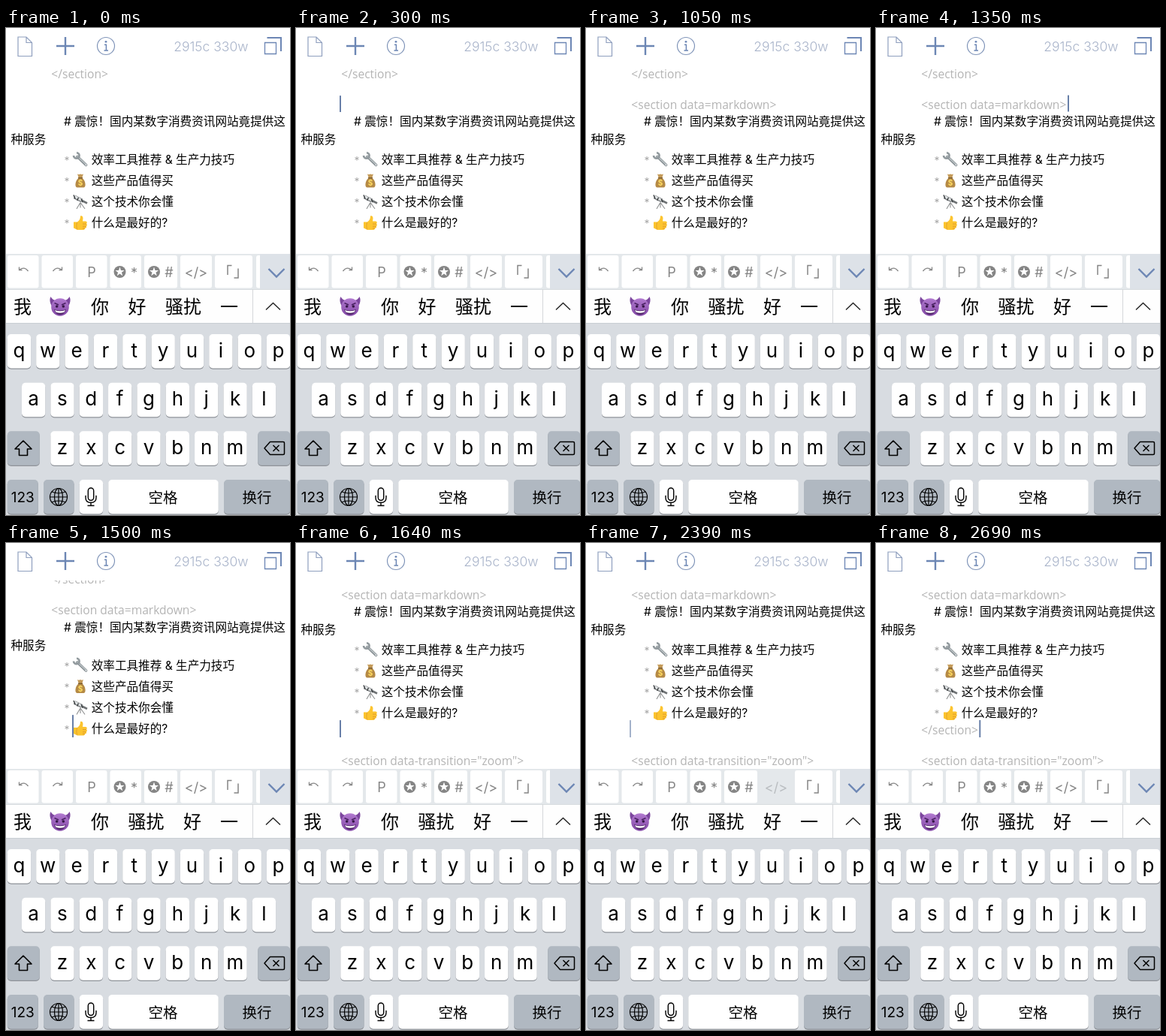
These frames come from a looping animation (378x649 px, 3.74 s). An HTML page with a canvas:

```html
<!DOCTYPE html>
<html lang="zh-CN">
<head>
<meta charset="utf-8">
<title>Markdown editor</title>
<style>
html, body { margin: 0; width: 100%; height: 100%; overflow: hidden; background: #fff; }
canvas { display: block; width: 378px; height: 649px; }
</style>
</head>
<body>
<canvas id="stage"></canvas>
<script>
const W = 378, H = 649, LOOP = 3740;
const canvas = document.getElementById('stage');
const dpr = window.devicePixelRatio || 1;
canvas.width = Math.round(W * dpr);
canvas.height = Math.round(H * dpr);
const c = canvas.getContext('2d');

const CJK = '"Noto Sans CJK SC", "Noto Sans CJK", sans-serif';
const CODE = '"Open Sans", "Noto Sans", sans-serif';
const KEYS = 'Inter, Roboto, sans-serif';
const BODY = '15.6px Inter, ' + CJK;
const BLUE = '#6c86b4', BED = '#d8dce1', BAR = '#e4e8eb', DARK = '#b0b8c1', GREY = '#858585';

// Caret: start time, x, top, height, opacity
const carets = [
  [0, 58, 90, 22, 0], [150, 58, 90, 22, .4], [300, 58, 90, 22, 1],
  [450, 255, 89.5, 22, 1], [750, 255, 89.5, 22, .4], [900, 255, 89.5, 22, 0],
  [1200, 255, 89.5, 22, .4], [1350, 255, 89.5, 22, 1],
  [1500, 88, 229, 30, 1],
  [1640, 58, 236, 23, 1], [1940, 58, 236, 23, .6], [2090, 58, 236, 23, 0],
  [2390, 58, 236, 23, .6], [2540, 137.3, 236, 23, 1]
];

function text(s, x, y, font, color, align = 'left') {
  c.font = font;
  c.fillStyle = color;
  c.textAlign = align;
  c.fillText(s, x, y);
}

function box(x, y, w, h, r, color) {
  c.fillStyle = color;
  c.beginPath();
  c.roundRect(x, y, w, h, r);
  c.fill();
}

function stroke(d, color, width) {
  c.strokeStyle = color;
  c.lineWidth = width;
  c.stroke(new Path2D(d));
}

function fill(d, color) {
  c.fillStyle = color;
  c.fill(new Path2D(d));
}

function disc(x, y, r, color) {
  c.fillStyle = color;
  c.beginPath();
  c.arc(x, y, r, 0, 7);
  c.fill();
}

function at(x, y, draw) {
  c.save();
  c.translate(x, y);
  draw();
  c.restore();
}

function wrench() {
  c.lineCap = 'round';
  stroke('M-4-4L7.5 7', '#858d91', 3.8);
  stroke('M-4-4.4L7.5 6.4', '#b9c0c3', 1.6);
  c.lineCap = 'butt';
  stroke('M-9-5.5A3.8 3.8 0 1 0-5-9.3', '#929a9e', 2.6);
  disc(7.5, 7, .9, '#eef1f2');
}

function moneyBag() {
  fill('M-2.5-3.5C-7 0-8 8.5-4.5 9H4.5C8 8.5 7 0 2.5-3.5Z', '#b58a45');
  fill('M-4-9Q-2-7.5 0-9Q2-7.5 4-9L2.3-4H-2.3Z', '#c49a58');
  stroke('M-3-3.7H3', '#7b5a2a', 1.4);
  text('$', 0, 6.8, 'bold 10px Inter, sans-serif', '#ffdc62', 'center');
}

function telescope() {
  stroke('M0 1L-5 9.5M0 1L6 9.5M0 1V8', '#8d8f90', 1.1);
  stroke('M-8-6.5L2-1.5', '#7a7e80', 5);
  stroke('M-7.5-6.8L1.5-2.2', '#dfe2e3', 3);
  stroke('M2-1.5L9 2', '#6f7375', 2.6);
  stroke('M-9-9L-7-4M1.2-3.8L3 .8M-2.6-5.5L-4.3-1.5', '#3c4042', 1.4);
}

function thumb() {
  fill('M-9-1H-4C-1-3 0-6 0-9Q3-10 3.5-6L3-2H7Q10-1 8 1.5Q10 3 7.7 4.8Q9 7 6 7.5Q6 10 2 9.5H-4L-9 7Z', '#fcc42f');
  stroke('M3 1.6H8M3 4.8H7.5M3 7.4H6', '#dd982c', .9);
  stroke('M-4.5-.5Q-6 4-4.5 8.8', '#e4a32c', 1);
}

function devil() {
  fill('M-11.5-1Q-15-8-12.5-13Q-10-8-5-8ZM11.5-1Q15-8 12.5-13Q10-8 5-8Z', '#7c469e');
  const g = c.createLinearGradient(0, -11, 0, 13);
  g.addColorStop(0, '#b27ad0');
  g.addColorStop(1, '#8349a6');
  disc(0, 1, 11.8, g);
  disc(-4.3, 0, 1.8, '#351746');
  disc(4.3, 0, 1.8, '#351746');
  stroke('M-7.5-4.5L-2-2M7.5-4.5L2-2', '#4b2263', 1.4);
  fill('M-8 4Q0 7 8 4Q6 11 0 11Q-6 11-8 4Z', '#4b2263');
  fill('M-7 5Q0 7.4 7 5L5.5 7.8Q0 9.5-5.5 7.8Z', '#fff');
}

const items = [
  ['效率工具推荐 & 生产力技巧', wrench],
  ['这些产品值得买', moneyBag],
  ['这个技术你会懂', telescope],
  ['什么是最好的?', thumb]
];

function editor(t) {
  const scroll = t < 1500 ? 0 : t < 1640 ? 12.5 : 33;
  const tag = (s, y) => text(s, 60.3, y, '15.6px ' + CODE, '#b4b4b4');
  c.save();
  c.beginPath();
  c.rect(0, 50, W, 251);
  c.clip();
  c.translate(0, -scroll);
  tag('</section>', 66.5);
  if (t >= 450) tag('<section data=markdown>', 107.5);
  text('# 震惊！国内某数字消费资讯网站竟提供这', 77, 130.3, BODY, '#000');
  text('种服务', 6.5, 154, BODY, '#000');
  items.forEach(([label, icon], i) => {
    const y = 175.5 + i * 28;
    text('*', 77.5, y + 6.5, '14px ' + KEYS, '#a8a8a8');
    at(99, y, icon);
    text(label, 113.7, y + 5.9, BODY, '#000');
  });
  if (t >= 2540) tag('</section>', 287.5);
  tag('<section data-transition="zoom">', 328.5);
  c.restore();

  const [, x, y, h, alpha] = carets.filter(k => k[0] <= t).pop();
  c.globalAlpha = alpha;
  box(x, y, 2, h, .5, '#687fa8');
  c.globalAlpha = 1;
}

function header() {
  stroke('M16 12H27L34.5 19.5V37.5H16ZM27 12V19.5H34.5', '#8f9fbe', 1.2);
  stroke('M67 24H91M79 12V36', BLUE, 2.4);
  stroke('M121.5 24a11.5 11.5 0 1 0 23 0a11.5 11.5 0 1 0-23 0', '#8195b9', 1.2);
  disc(133, 18.3, 1.4, BLUE);
  stroke('M131 22.3H133.4V30M130.5 30H136', BLUE, 1.5);
  text('2915c 330w', 322.5, 31, '300 17.5px ' + KEYS, '#a9b4ca', 'right');
  stroke('M344.5 19.5H359.5V34.5H344.5Z', BLUE, 1.3);
  stroke('M347.5 13H366V31', BLUE, 2);
}

function badge(x) {
  disc(x, 325, 8, GREY);
  c.beginPath();
  for (let i = 0; i < 10; i++) {
    const a = i * Math.PI / 5 - Math.PI / 2, r = i % 2 ? 2.6 : 6.4;
    c.lineTo(x + r * Math.cos(a), 325 + r * Math.sin(a));
  }
  c.fillStyle = '#fff';
  c.fill();
}

function toolbar(t) {
  const pressed = t >= 2390 && t < 2540;
  const label = (s, x, y = 331.5, color = GREY) =>
    text(s, x, y, '18px ' + KEYS, color, 'center');
  box(0, 301, W, 47, 0, BAR);
  [[2, 41.5], [47.5, 41.5], [93, 41.5], [138.5, 41.5], [184, 44], [232, 42], [278, 50], [333, 5]]
    .forEach(([x, w], i) => {
      if (i === 5 && pressed) return;
      box(x, 303, w, 43.5, i === 7 ? [3, 0, 0, 3] : 3, '#fff');
    });
  const arrow = 'M17.5 318.5V322.7H21.5M17.8 322.4Q24.5 317 29.5 324';
  stroke(arrow, GREY, 1.3);
  at(92, 0, () => {
    c.scale(-1, 1);
    stroke(arrow, GREY, 1.3);
  });
  label('P', 114);
  badge(151.5);
  label('*', 170.5, 333);
  badge(197);
  label('#', 217);
  label('</>', 253, 331.5, pressed ? '#b9bdc0' : GREY);
  stroke('M300.5 316.5H295V329M303.5 333H309V320.5', GREY, 1.5);
  box(338, 301, 40, 47, 0, '#dde2e8');
  stroke('M349.5 321L360 331.5L370.5 321', BLUE, 2.4);
}

function candidates(t) {
  const swapped = t >= 450;
  box(0, 348, W, 45, 0, '#fefefe');
  box(0, 348, W, .7, 0, '#cbd0d5');
  const word = (s, x) => text(s, x, 380, '24px ' + CJK, '#000', 'center');
  word('我', 22);
  at(72, 371, devil);
  word('你', 125);
  word('好', swapped ? 248 : 174.5);
  word('骚扰', swapped ? 186.5 : 236);
  word('一', 297);
  box(328, 348, 1, 45, 0, '#d4d7da');
  stroke('M346 375.5L355.5 366.5L365 375.5', '#222', 1.4);
}

function key(x, y, w, color = '#fff') {
  box(x, y + 1.2, w, 45.5, 5, '#8f9399');
  box(x, y, w, 45.5, 5, color);
}

function keyboard() {
  const pitch = 38.35;
  box(0, 393, W, 256, 0, BED);
  box(0, 393, W, .7, 0, '#c5cad0');
  [['qwertyuiop', 1.8, 408], ['asdfghjkl', 21, 472.7], ['zxcvbnm', 59.3, 537.3]]
    .forEach(([row, left, y]) => [...row].forEach((ch, i) => {
      const x = left + i * pitch;
      key(x, y, 31.3);
      text(ch, x + 15.6, y + 30.5, '26px ' + KEYS, '#000', 'center');
    }));

  key(1.8, 537.3, 43, DARK);
  key(335.2, 537.3, 43, DARK);
  c.lineJoin = 'round';
  stroke('M23 550L34 561H28.5V569.5H17.5V561H12Z', '#000', 1.6);
  stroke('M344 560L351.5 551.5H369Q370.5 551.5 370.5 553V567Q370.5 568.5 369 568.5H351.5Z', '#000', 1.5);
  stroke('M355.5 556L363.5 564M363.5 556L355.5 564', '#000', 1.5);
  c.lineJoin = 'miter';

  const y = 602;
  key(1.8, y, 41, DARK);
  key(50, y, 40.5, DARK);
  key(97.8, y, 31.3);
  key(136.2, y, 146.6);
  key(290, y, 88.3, DARK);
  text('123', 22.2, 632, '19px ' + KEYS, '#000', 'center');
  text('空格', 209, 632.5, '19.5px ' + CJK, '#000', 'center');
  text('换行', 334, 632.5, '19.5px ' + CJK, '#000', 'center');

  at(70, 625, () => {
    c.strokeStyle = '#000';
    c.lineWidth = 1.2;
    for (const rx of [11.5, 5.5]) {
      c.beginPath();
      c.ellipse(0, 0, rx, 11.5, 0, 0, 7);
      c.stroke();
    }
    stroke('M0-11.5V11.5M-11.5 0H11.5M-9-7Q0-3 9-7M-9 7Q0 3 9 7', '#000', 1.2);
  });
  at(113, 625, () => {
    c.strokeStyle = '#000';
    c.lineWidth = 1.4;
    c.beginPath();
    c.roundRect(-3.7, -12, 7.4, 16.5, 3.7);
    c.stroke();
    stroke('M-7-2V1Q-7 7.5 0 7.5Q7 7.5 7 1V-2M0 7.5V11.5M-4.5 11.5H4.5', '#000', 1.4);
  });
}

function draw(t) {
  c.setTransform(dpr, 0, 0, dpr, 0, 0);
  box(0, 0, W, H, 0, '#fff');
  editor(t);
  header();
  toolbar(t);
  candidates(t);
  keyboard();
}

const start = performance.now();
function tick() {
  draw((performance.now() - start) % LOOP);
  requestAnimationFrame(tick);
}
tick();
</script>
</body>
</html>
```
